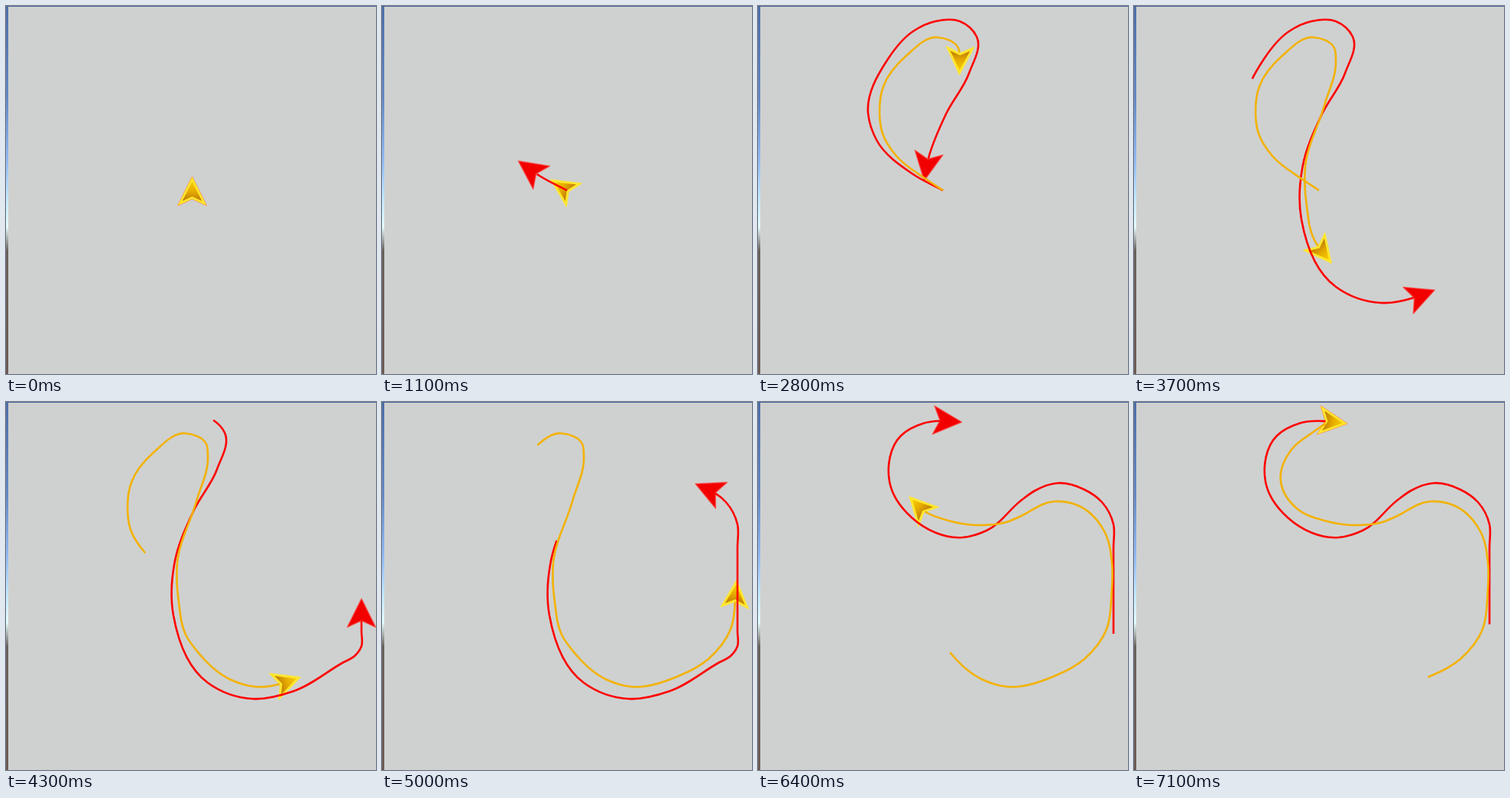
An HTML page that plays this animation: 484x481 px, repeating every 8700 ms.

```html
<!DOCTYPE html>
<html lang="en">
<head>
<meta charset="utf-8">
<title>Leader and follower</title>
<style>
  html, body { margin: 0; width: 100%; height: 100%; overflow: hidden; background: #cfd1d0; }
  svg { display: block; width: 100%; height: 100%; }
  .trail { fill: none; stroke-width: 2.6; stroke-linejoin: round; }
</style>
</head>
<body>
<svg viewBox="0 0 484 481">
  <defs>
    <linearGradient id="sky" x1="0" y1="0" x2="0" y2="1">
      <stop offset="0" stop-color="#4f6ea8"/>
      <stop offset=".25" stop-color="#6588c6"/>
      <stop offset=".42" stop-color="#92b9f3"/>
      <stop offset=".52" stop-color="#c2e6ff"/>
      <stop offset=".6" stop-color="#e2fbfa"/>
      <stop offset=".665" stop-color="#6a605b"/>
      <stop offset="1" stop-color="#6c5b54"/>
    </linearGradient>
    <linearGradient id="gold" x1="0" y1="0" x2="0" y2="1">
      <stop offset="0" stop-color="#f8cd00"/>
      <stop offset=".5" stop-color="#e6ac00"/>
      <stop offset="1" stop-color="#bd7a08"/>
    </linearGradient>
  </defs>
  <rect width="484" height="481" fill="#cfd1d0"/>
  <rect width="3" height="481" fill="url(#sky)"/>
  <rect width="484" height="1" fill="#4d6a9f"/>
  <path id="leader" d="M0-18.5L18.5 18.5L0 10L-18.5 18.5Z" fill="#f20000" stroke="#ff3a34" stroke-opacity=".65" stroke-width="1.6" stroke-linejoin="round"/>
  <g id="follower">
    <path d="M0-18.5L18.5 18.5L0 10L-18.5 18.5Z" fill="#ffe72c" stroke="#ffe636" stroke-opacity=".75" stroke-width="1" stroke-linejoin="round"/>
    <path d="M0-12.5L13 13L0 7L-13 13Z" fill="url(#gold)"/>
  </g>
  <path id="leaderTrail" class="trail" stroke="#ff0000"/>
  <path id="followerTrail" class="trail" stroke="#f3b200"/>
</svg>
<script>
const LOOP = 8700, START = 900, STEP = 100, LAST = 63;
const TRAIL = 648, GAP = 11, LOOK = 8;

// Key points of each route: x, y and, where known, the step of arrival.
// The last point only sets the final heading.
const leaderRoute = [
  [242, 241, 1], [203, 220], [155, 175], [144, 140], [169.5, 70, 9],
  [203, 33], [232, 20], [264, 20], [286, 40], [276, 88], [246, 141], [220.5, 210, 20],
  [219, 279], [264, 367], [323, 388], [376, 378, 29],
  [440, 341], [456, 332], [465, 319], [465, 300], [465, 190], [465, 160], [450, 131], [427, 114.5, 42],
  [392, 106], [362, 116], [345, 128], [299, 168], [268, 177], [201, 151, 50],
  [172, 104], [187, 44], [216, 28], [260.5, 26, 56.4], [268.5, 27]
];
const followerRoute = [
  [242, 241, 1], [221, 227], [181, 196, 9],
  [163, 167], [159, 140], [164, 105], [194, 65], [235, 41], [262, 55], [264, 71.5, 20],
  [249, 130], [224, 210], [226, 262], [236, 306], [247, 322, 29],
  [294, 363], [325, 372], [386, 359], [428, 335], [456, 297], [462.5, 251, 42],
  [463, 210], [453, 169], [418, 135], [387, 130], [342, 150, 50],
  [325, 157], [295, 161], [249, 155], [214, 140], [192, 104], [207, 61], [232, 41],
  [260.5, 26, 62.5], [268.5, 27]
];

const unit = (x, y) => { const r = Math.hypot(x, y) || 1; return [x / r, y / r]; };

// Unit tangent at point i; the nearer neighbour counts more.
function tangent(points, i) {
  let tx = 0, ty = 0;
  for (const [a, b] of [[i - 1, i], [i, i + 1]]) {
    if (!points[a] || !points[b]) continue;
    const dx = points[b][0] - points[a][0], dy = points[b][1] - points[a][1];
    const w = dx * dx + dy * dy;
    tx += dx / w;
    ty += dy / w;
  }
  return unit(tx, ty);
}

// Draws a smooth curve through the points and returns [step, distance] pairs.
function layRoute(path, points) {
  const stops = [];
  let d = "";
  points.forEach(([x, y, step], i) => {
    if (i === 0) {
      d = `M${x} ${y}`;
    } else {
      const [px, py] = points[i - 1];
      const [ux, uy] = tangent(points, i - 1), [vx, vy] = tangent(points, i);
      const k = Math.hypot(x - px, y - py) / 3;
      d += `C${px + ux * k} ${py + uy * k} ${x - vx * k} ${y - vy * k} ${x} ${y}`;
    }
    path.setAttribute("d", d);
    if (step) stops.push([step, i ? path.getTotalLength() : 0]);
  });
  return stops;
}

// The power eases the first leg.
function makeRunner(id, route, power) {
  const body = document.getElementById(id);
  const trail = document.getElementById(id + "Trail");
  const stops = layRoute(trail, route);
  const at = s => trail.getPointAtLength(s);

  function travelled(n) {
    if (n <= stops[0][0]) return 0;
    const i = stops.findIndex(stop => stop[0] >= n);
    if (i < 0) return stops[stops.length - 1][1];
    const [n0, s0] = stops[i - 1], [n1, s1] = stops[i];
    const u = (n - n0) / (n1 - n0);
    return s0 + (s1 - s0) * (i === 1 ? u ** power : u);
  }

  return n => {
    const s = travelled(n), p = at(s), q = at(s + LOOK);
    const angle = Math.atan2(q.x - p.x, p.y - q.y) * 180 / Math.PI;
    body.setAttribute("transform", n ? `translate(${p.x} ${p.y}) rotate(${angle})` : "translate(243.5 242)");
    const tail = Math.max(0, s - TRAIL), length = Math.max(0, s - GAP - tail);
    trail.setAttribute("visibility", length ? "visible" : "hidden");
    trail.setAttribute("stroke-dasharray", `0 ${tail} ${length} 9999`);
  };
}

const runners = [
  makeRunner("leader", leaderRoute, 1),
  makeRunner("follower", followerRoute, 1.7)
];

function draw(time) {
  const t = time % LOOP;
  const n = t < START ? 0 : Math.min(LAST, Math.floor((t - START) / STEP) + 1);
  runners.forEach(run => run(n));
}

const begun = performance.now();
function tick() {
  draw(performance.now() - begun);
  requestAnimationFrame(tick);
}
tick();
</script>
</body>
</html>
```
